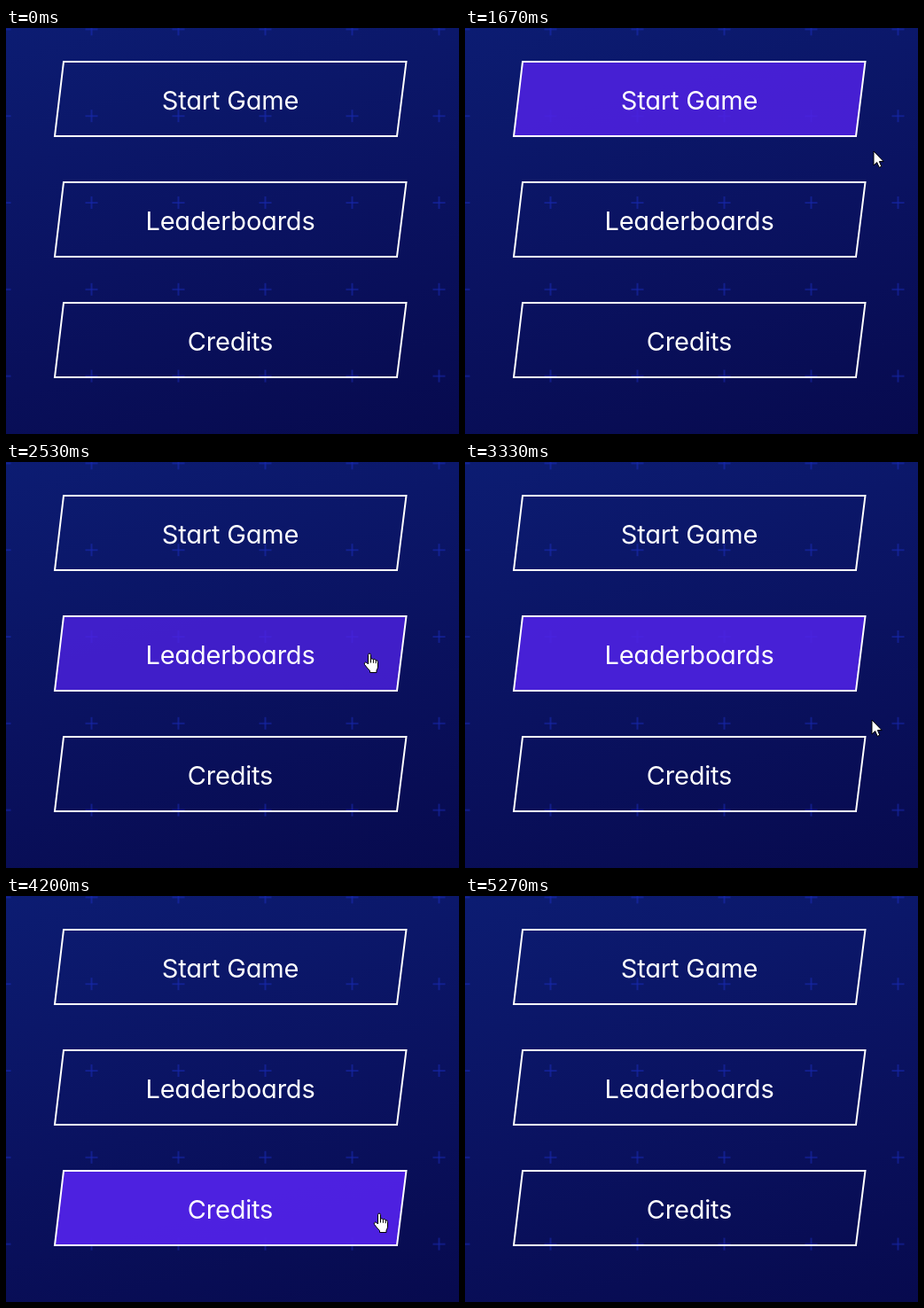
These frames come from a looping animation (511x458 px, 5790 ms). An HTML page:

```html
<!DOCTYPE html>
<html lang="en">
<head>
<meta charset="utf-8">
<title>Game menu</title>
<style>
  html, body { margin: 0; height: 100%; overflow: hidden; }
  svg { display: block; width: 511px; height: 458px; background: linear-gradient(165deg, #0c1c72, #0a1260 52%, #070a4e); }
  text { font: 29px Inter, Lato, sans-serif; font-feature-settings: "cv11"; letter-spacing: -.2px; fill: #fff; text-anchor: middle; }
  .edge { fill: none; stroke: #fff; stroke-width: 2; }
  .fill { fill: #5022e6; opacity: 0; }
  #cursor path { fill: #fff; stroke: #000; stroke-linejoin: round; }
</style>
</head>
<body>
<svg viewBox="0 0 511 458">
  <defs>
    <pattern id="pluses" x="47.5" y="-47.5" width="98" height="97.8" patternUnits="userSpaceOnUse">
      <path d="M42 49H56M49 42V56" stroke="#1c30d0" stroke-opacity=".62" stroke-width="1.3"/>
    </pattern>
    <path id="frame" d="M65 38H451.5L441 122H55Z"/>
  </defs>
  <rect width="511" height="458" fill="url(#pluses)"/>
  <g id="menu"></g>
  <g id="cursor">
    <path id="arrow" d="M0 0V16L3.7 12.6L6.2 18.3L8.8 17.2L6.4 11.6H11.2Z"/>
    <path id="hand" d="M-1.5 12V1.7Q-1.5 0 0 0T1.5 1.7V6.3Q3 5 4.4 6.8Q6 5.8 7.2 7.6Q9.5 7.3 9.5 9.5V15Q9.5 17 8 19V21.5H.5V19.5Q-3 16 -5.5 12.5Q-6.5 10.5 -4.5 10Q-3 10 -1.5 12ZM1.5 6V10.5M4.4 6.8V10.8M7.2 7.6V11.2"/>
  </g>
</svg>
<script>
const LOOP = 5790, FADE = 500;
const $ = id => document.getElementById(id);
const clamp = p => Math.min(1, Math.max(0, p));

const buttons = [
  { label: 'Start Game', enter: 650, leave: 1605 },
  { label: 'Leaderboards', enter: 2290, leave: 3275 },
  { label: 'Credits', enter: 3820, leave: 4770 }
];

$('menu').innerHTML = buttons.map((b, i) => `
  <g transform="translate(0 ${i * 136})">
    <use href="#frame" class="fill"/>
    <use href="#frame" class="edge"/>
    <text x="253" y="91.5">${b.label}</text>
  </g>`).join('');
const fills = document.querySelectorAll('.fill');

const easeIn = p => p ** 3;
const easeOut = p => 1 - (1 - p) ** 3;
const easeInOut = p => p < .5 ? 4 * p ** 3 : 1 - 4 * (1 - p) ** 3;
const easeSharp = p => p < .5 ? 8 * p ** 4 : 1 - 8 * (1 - p) ** 4;

// The CSS "ease" curve: cubic-bezier(.25, .1, .25, 1)
function cssEase(x) {
  const bezier = (u, a, b) => 3 * u * (1 - u) ** 2 * a + 3 * u * u * (1 - u) * b + u ** 3;
  let low = 0, high = 1;
  for (let i = 0; i < 20; i++) {
    const mid = (low + high) / 2;
    if (bezier(mid, .25, .25) < x) low = mid; else high = mid;
  }
  return bezier(low, .1, 1);
}

// Cursor moves: start, end, target x, target y, easing
const origin = [514, 74];
const moves = [
  [450, 1000, 418, 83, easeOut],
  [1330, 1830, 465, 144, easeSharp],
  [2000, 2530, 410, 216, easeInOut],
  [3070, 3460, 467, 304, easeInOut],
  [3640, 4050, 421, 358, easeInOut],
  [4600, 4880, 431, 519, easeIn]
];

function cursorAt(t) {
  let [x, y] = origin;
  for (const [start, end, toX, toY, ease] of moves) {
    const p = ease(clamp((t - start) / (end - start)));
    x += (toX - x) * p;
    y += (toY - y) * p;
  }
  return [x, y];
}

function draw(now) {
  const t = now % LOOP;
  let hovering = false;
  buttons.forEach(({ enter, leave }, i) => {
    const fade = start => cssEase(clamp((t - start) / FADE));
    fills[i].style.opacity = fade(enter) - fade(leave);
    hovering ||= t >= enter && t < leave;
  });
  const [x, y] = cursorAt(t).map(Math.round);
  $('cursor').setAttribute('transform', `translate(${x} ${y})`);
  $('cursor').style.display = t >= 470 && t < 4880 ? '' : 'none';
  $('hand').style.display = hovering ? '' : 'none';
  $('arrow').style.display = hovering ? 'none' : '';
  requestAnimationFrame(draw);
}
draw(0);
</script>
</body>
</html>
```
